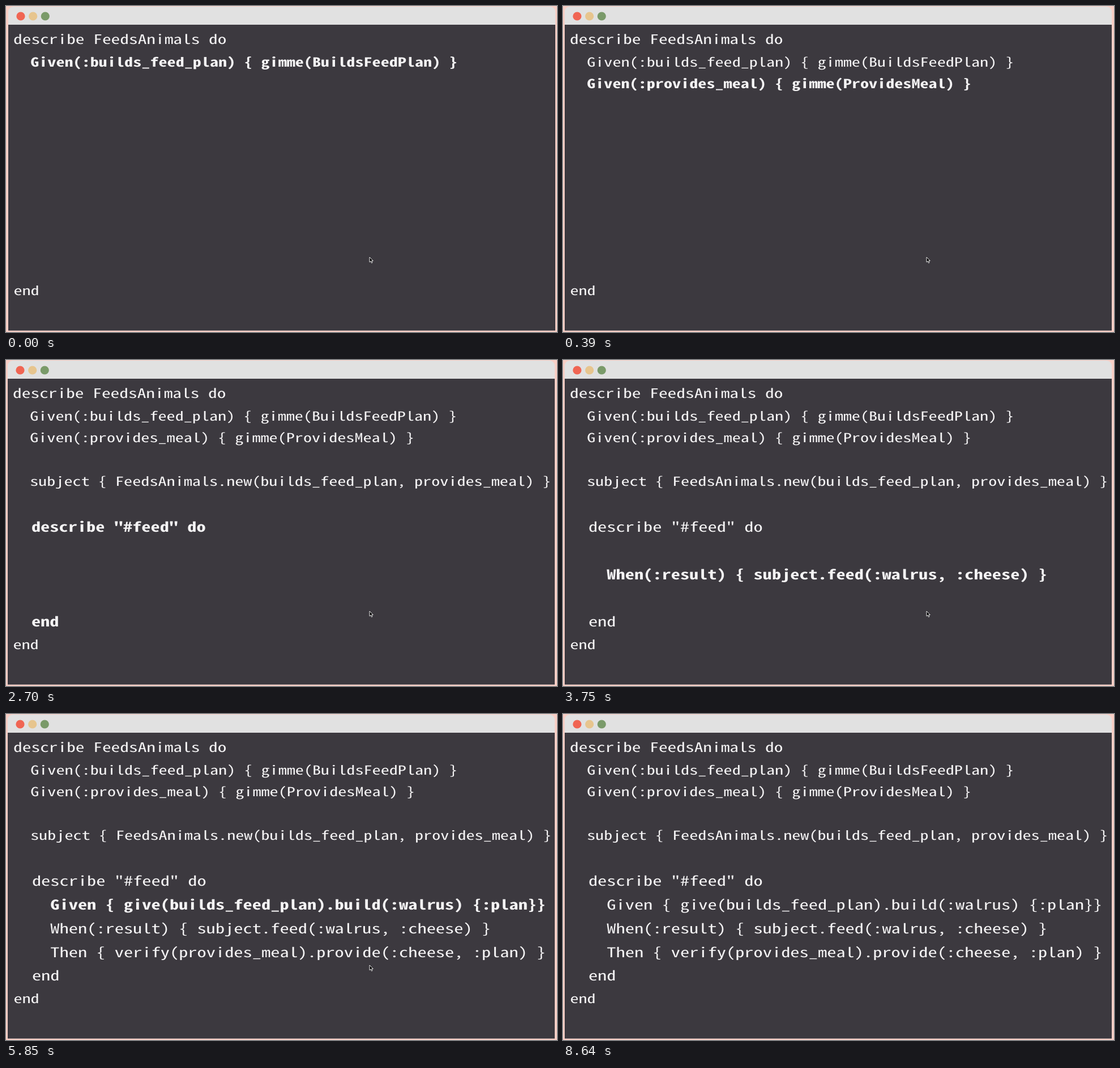
An HTML page for the animation above (9.04 s loop, 973 by 575 pixels).

```html
<!DOCTYPE html>
<html lang="en">
<head>
<meta charset="utf-8">
<title>Spec walkthrough</title>
<style>
  html, body { margin: 0; width: 100%; height: 100%; overflow: hidden; background: #f8cfc6; }
  svg { display: block; width: 973px; height: 575px; }
  :root { --size: .9; --widen: 1.33; }

  text {
    font-family: "Noto Sans Mono CJK JP", "Noto Sans Mono", monospace;
    font-size: calc(var(--em) * var(--size));
    font-variant-ligatures: none;
    text-rendering: geometricPrecision;
    fill: #f5f4f5;
    transform-box: fill-box;
    transform-origin: 0 0;
    transform: scaleX(var(--widen));
  }
  .outer { --em: 26.15px; }
  .setup { --em: 25.15px; }
  .inner { --em: 27.03px; }

  .window, .code, .code text, .cursor { animation: 9040ms step-end infinite; }
  .window { animation-name: window; }
  .code { animation-name: code; }
  .cursor { animation-name: cursor; }
  .code .plan { animation-name: plan; }
  .code .meal { animation-name: meal; }
  .code .subject { animation-name: subject; }
  .code .block { animation-name: block; }
  .code .when { animation-name: when; }
  .code .then { animation-name: then; }
  .code .given { animation-name: given; }

  @keyframes window {
    0% { transform: translateX(1px); }
    4.314% { transform: none; }
  }
  @keyframes code {
    0%, 64.712% { transform: translateX(1px); }
    4.314%, 79.646% { transform: none; }
  }
  @keyframes cursor {
    0% { transform: translate(641px, 442px); visibility: visible; }
    90.265% { transform: translate(814px, 517px); }
    92.257% { transform: translate(902px, 561px); }
    93.916% { transform: translate(921px, 573.5px); }
    95.575% { visibility: hidden; }
  }
  /* Each line appears bold, then settles to regular. */
  @keyframes plan {
    0% { font-weight: 700; }
    1.659% { font-weight: 400; }
  }
  @keyframes meal {
    0% { visibility: hidden; font-weight: 700; }
    1.659% { visibility: visible; }
    15.929% { font-weight: 400; }
  }
  @keyframes subject {
    0% { visibility: hidden; font-weight: 700; }
    15.929% { visibility: visible; }
    29.867% { font-weight: 400; }
  }
  @keyframes block {
    0% { visibility: hidden; font-weight: 700; }
    29.867% { visibility: visible; }
    41.482% { font-weight: 400; }
  }
  @keyframes when {
    0% { visibility: hidden; font-weight: 700; }
    41.482% { visibility: visible; }
    53.097% { font-weight: 400; }
  }
  @keyframes then {
    0% { visibility: hidden; }
    53.097% { visibility: visible; }
  }
  @keyframes given {
    0% { visibility: hidden; font-weight: 700; }
    64.712% { visibility: visible; }
    79.646% { font-weight: 400; }
  }
</style>
</head>
<body>
<svg viewBox="0 0 973 575">
  <g class="window">
    <path d="M3 572.5V10a9 9 0 0 1 9-9H960a9 9 0 0 1 9 9V572.5z" fill="#e1e1e1"/>
    <path d="M3 33H969V572.5H3z" fill="#3c393f"/>
    <circle cx="25" cy="18" r="7.6" fill="#f06553"/>
    <circle cx="46.7" cy="18" r="7.6" fill="#e7c58e"/>
    <circle cx="68.3" cy="18" r="7.6" fill="#7a9a69"/>
  </g>
  <g class="code">
    <text class="outer" x="12.1" y="67.4">describe FeedsAnimals do</text>
    <text class="setup plan" x="42.2" y="106.6">Given(:builds_feed_plan) { gimme(BuildsFeedPlan) }</text>
    <text class="setup meal" x="42.2" y="144.9">Given(:provides_meal) { gimme(ProvidesMeal) }</text>
    <text class="setup subject" x="42.2" y="221.5">subject { FeedsAnimals.new(builds_feed_plan, provides_meal) }</text>
    <text class="inner block" x="44.9" y="303.2">describe "#feed" do</text>
    <text class="inner given" x="77.3" y="345">Given { give(builds_feed_plan).build(:walrus) {:plan}}</text>
    <text class="inner when" x="77.3" y="386.8">When(:result) { subject.feed(:walrus, :cheese) }</text>
    <text class="inner then" x="77.3" y="428.6">Then { verify(provides_meal).provide(:cheese, :plan) }</text>
    <text class="inner block" x="44.9" y="470.4">end</text>
    <text class="setup" x="12.4" y="509.7">end</text>
  </g>
  <path class="cursor" d="M1 1V9.8L3 8L4.5 11.3L6 10.6L4.6 7.4H7.3z" fill="#000" stroke="#fff" stroke-width=".9"/>
</svg>
<script>
  // Give the condensed face wide coding proportions: capitals .66em tall, pitch .6em.
  const pen = document.createElement("canvas").getContext("2d");
  pen.font = "1000px " + getComputedStyle(document.querySelector("text")).fontFamily;
  const { width, actualBoundingBoxAscent: capHeight } = pen.measureText("H");
  const size = 660 / capHeight;
  const root = document.documentElement.style;
  root.setProperty("--size", size);
  root.setProperty("--widen", 600 / (width * size));
</script>
</body>
</html>
```
